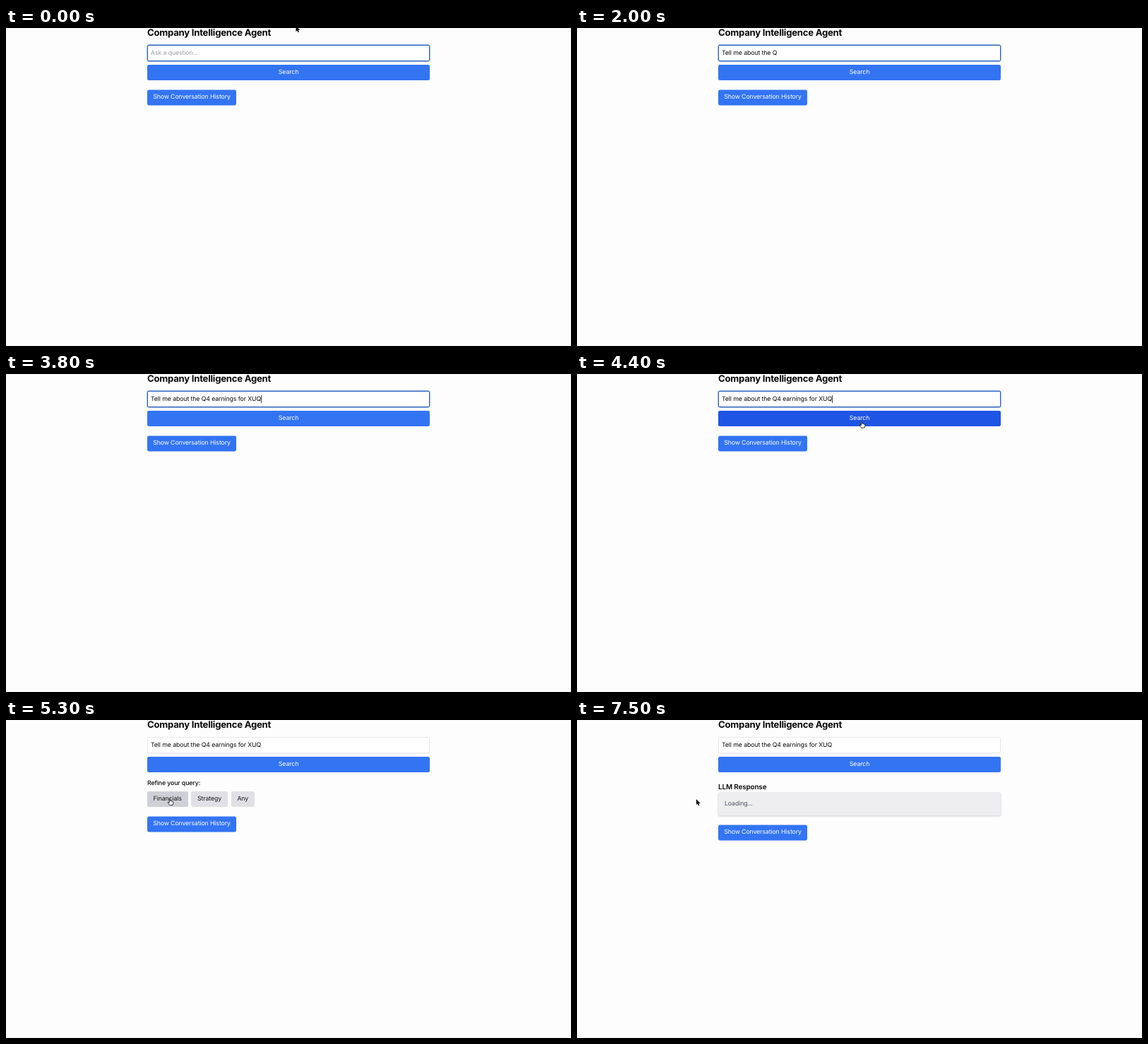
An HTML page that plays this animation: 800 by 450 pixels, repeating every 8 s.

```html
<!DOCTYPE html>
<html lang="en">
<head>
<meta charset="utf-8">
<title>Intelligence agent</title>
<style>
  html, body { margin: 0; width: 100%; height: 100%; overflow: hidden; }
  body {
    position: relative; background: #fdfdfd; color: #08080a;
    box-shadow: inset 0 0 0 1px #f7f7f8;
    font: 8.75px/22px Inter, sans-serif; letter-spacing: -.012em;
    text-rendering: geometricPrecision; white-space: pre;
  }
  body > * { position: absolute; box-sizing: border-box; }
  h1, h2, h3 { margin: 0; left: 200px; }
  h1 { top: -4.5px; font-size: 13.1px; font-weight: 700; letter-spacing: -.017em; }
  h2 { top: 84px; font-size: 9.85px; font-weight: 600; }
  h3 { top: 78.5px; font-size: 8.75px; font-weight: 500; }

  .field {
    left: 200px; top: 24px; width: 400px; height: 23px; padding-left: 5px;
    line-height: 24px; border-radius: 2.3px; background: #fff;
    box-shadow: inset 0 0 0 .8px #dfe0e5, 0 .6px 1px #0000000a;
  }
  .focus .field { box-shadow: inset 0 0 0 1px #2a63bf, 0 0 0 .4px #2a63bf; }
  .hint { color: #9a9ca3; }
  .caret {
    display: inline-block; width: 1px; height: 11px; margin-right: -1px;
    vertical-align: -2.5px; background: #444;
  }

  .btn { height: 22px; border-radius: 2.3px; background: #3374f3; color: #fff; text-align: center; }
  .search { left: 200px; top: 52px; width: 400px; line-height: 23px; }
  .search.hover { background: #1f55e5; }
  .history { left: 200px; top: 87px; width: 126px; transform: translateY(.4px); }
  .chip { top: 100.5px; height: 22.5px; background: #e0e0e6; color: #16161a; }
  .chip.hover { background: #cfd0d7; }
  .box {
    left: 200px; top: 103px; width: 400px; height: 32px; padding-left: 9px;
    line-height: 32px; border-radius: 2.3px; background: #eeeef0; color: #4b5260;
    box-shadow: 0 0 0 .5px #dcdde1, 0 1.5px 2.5px #00000024;
  }

  .refine, .reply { display: none; }
  [data-step=refine] .refine, [data-step=reply] .reply { display: block; }
  [data-step=refine] .history { top: 136px; }
  [data-step=reply] .history { top: 148px; }

  .mouse { left: 0; top: 0; width: 12px; height: 14px; overflow: visible; }
  .mouse path { stroke-linejoin: round; }
  .arrow { fill: #000; stroke: #fff; stroke-width: .9; paint-order: stroke; }
  .hand { fill: #fff; stroke: #111; stroke-width: .8; }
</style>
</head>
<body data-step="ask" class="focus">
  <h1>Company Intelligence Agent</h1>
  <div class="field"><span class="hint">Ask a question...</span><span class="typed"></span><i class="caret"></i></div>
  <div class="btn search">Search</div>

  <h3 class="refine">Refine your query:</h3>
  <div class="btn chip refine" style="left:200px;width:57.5px">Financials</div>
  <div class="btn chip refine" style="left:262px;width:52px">Strategy</div>
  <div class="btn chip refine" style="left:318.5px;width:33.5px">Any</div>

  <h2 class="reply">LLM Response</h2>
  <div class="box reply">Loading...</div>

  <div class="btn history">Show Conversation History</div>

  <svg class="mouse">
    <path class="arrow" d="M0 0V8L1.8 6.4 3 9.2 4.4 8.6 3.2 5.9H5.6Z"/>
    <path class="hand" transform="scale(1.08)" d="M-.7 .6Q0-.4 .7 .6V3.4Q1.6 2.8 2 3.7 2.9 3.2 3.3 4 4.4 3.7 4.5 4.9V6.3L3.6 8.8H-.3L-2.6 5.7Q-2.7 4.6-1.7 4.9L-.7 5.8Z"/>
  </svg>

<script>
const LOOP = 8000, TICK = 100;
const QUERY = 'Tell me about the Q4 earnings for XUQ';

// Typing bursts: first key, last key, length before, length after
const BURSTS = [
  [100, 600, 0, 8], [800, 1500, 8, 18], [1700, 1700, 18, 19],
  [2300, 2400, 19, 21], [2600, 3000, 21, 28], [3200, 3800, 28, 37]
];
// Pointer path: time, x, y
const PATH = [
  [4100, 411, -2], [4200, 410, 13], [4300, 407, 52], [4400, 403, 66.7],
  [4600, 403, 66.7], [4700, 394, 75], [4800, 376, 82], [4900, 330, 95],
  [5000, 268, 108], [5100, 232, 111], [5300, 232, 111], [5600, 207, 115],
  [5900, 172, 113], [6000, 169, 112]
];

const $ = s => document.querySelector(s);
const hint = $('.hint'), typed = $('.typed'), caret = $('.caret'), search = $('.search');
const chip = $('.chip'), mouse = $('.mouse'), arrow = $('.arrow'), hand = $('.hand');
const show = (el, on) => { el.style.display = on ? '' : 'none'; };
const within = (t, a, b) => t >= a && t < b;

function typedLength(t) {
  let n = 0;
  for (const [start, end, from, to] of BURSTS) {
    if (t < start) break;
    const steps = (end - start) / TICK + 1;
    const done = Math.min(steps, (t - start) / TICK + 1);
    n = from + Math.round((to - from) * done / steps);
  }
  return n;
}

function pointer(t) {
  if (t < 100) return [410.5, -3];
  const i = PATH.findIndex(p => p[0] > t);
  if (i < 0) return PATH.at(-1).slice(1);
  if (i === 0) return null;
  const [t0, x0, y0] = PATH[i - 1], [t1, x1, y1] = PATH[i];
  const k = (t - t0) / (t1 - t0);
  return [x0 + (x1 - x0) * k, y0 + (y1 - y0) * k];
}

function draw() {
  const t = Math.floor(performance.now() % LOOP / TICK) * TICK;
  const n = typedLength(t), pos = pointer(t);
  const overSearch = within(t, 4300, 4700), overChip = within(t, 5000, 5400);

  document.body.dataset.step = t < 4600 ? 'ask' : t < 5400 ? 'refine' : 'reply';
  document.body.classList.toggle('focus', t < 4600);
  typed.textContent = QUERY.slice(0, n);
  show(hint, n === 0);
  show(caret, within(t, 100, 2000) || within(t, 2300, 4600));
  search.classList.toggle('hover', overSearch);
  chip.classList.toggle('hover', overChip);

  show(mouse, pos);
  if (pos) mouse.style.transform = `translate(${pos[0]}px, ${pos[1]}px)`;
  show(hand, overSearch || overChip);
  show(arrow, !overSearch && !overChip);
  requestAnimationFrame(draw);
}
draw();
</script>
</body>
</html>
```
